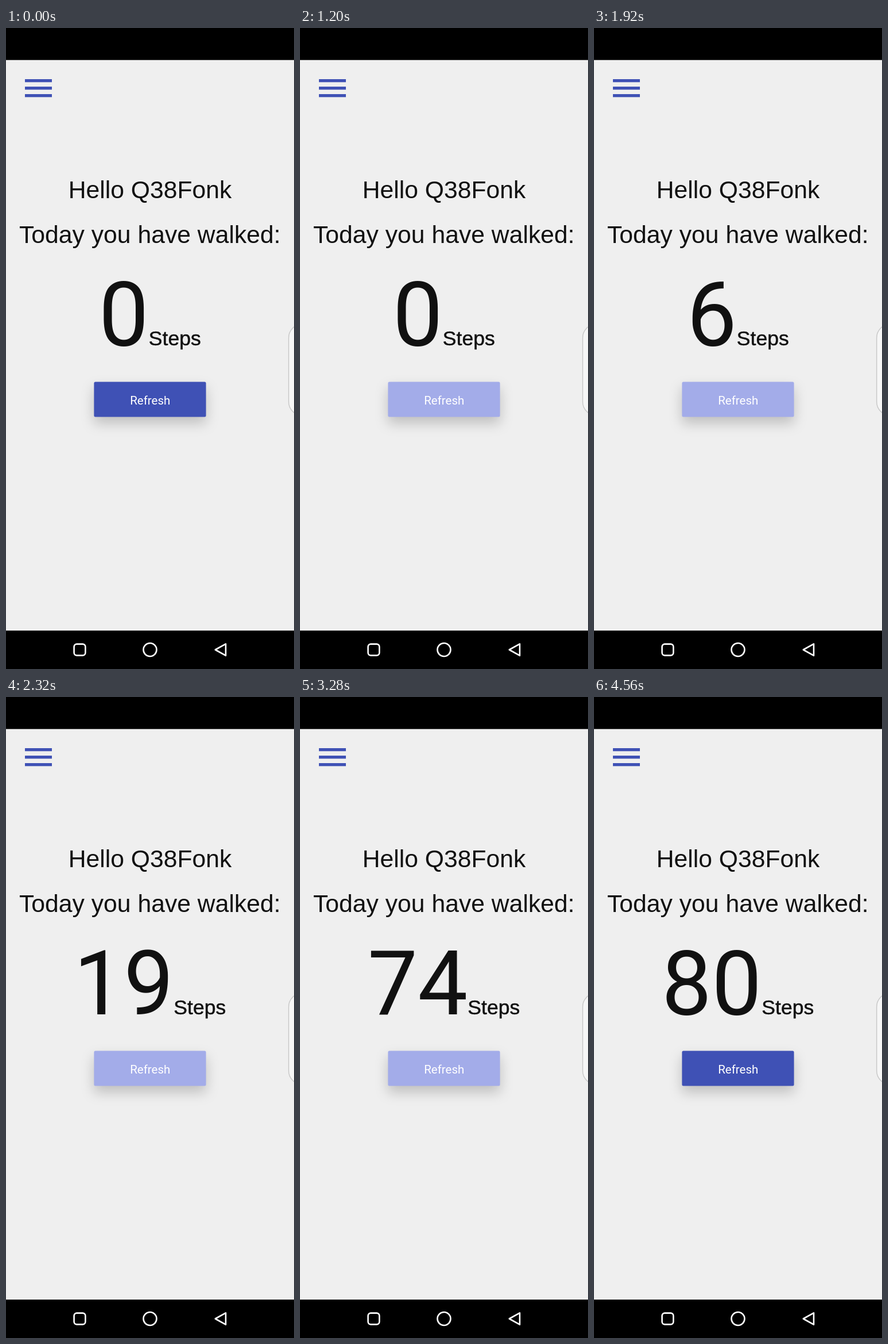
Write an HTML page that moves like this. It is 502x1115 px and loops after 4.64 s.

```html
<!DOCTYPE html>
<html lang="en">
<head>
<meta charset="utf-8">
<title>Step counter</title>
<style>
  html, body { margin: 0; width: 100%; height: 100%; overflow: hidden; background: #efefef; }
  svg { position: absolute; left: 0; top: 0; display: block; }
  #button { fill: #3f51b5; filter: drop-shadow(0 11px 11px rgba(0,0,0,.2)); }
  #button.busy { fill: #a3ace9; }
  text { text-anchor: middle; fill: #111; font-family: "Liberation Sans", Arial, sans-serif; }
  .title { font-size: 42.7px; }
  .unit { font-size: 35.6px; stroke: #111; stroke-width: .5; }
  #count { font: 155px Roboto, sans-serif; }
  .label { font: 20.5px Roboto, sans-serif; fill: #fff; }
  .nav { fill: none; stroke: #fff; stroke-width: 2.6; stroke-linejoin: round; }
</style>
</head>
<body>
<svg width="502" height="1115" viewBox="0 0 502 1115">
  <rect width="502" height="55.7"/>
  <rect y="1048.2" width="502" height="67"/>
  <path d="M33 91.7h47M33 104.7h47M33 117.7h47" stroke="#3f51b5" stroke-width="5.3"/>
  <rect x="492.7" y="515" width="60" height="159" rx="24" fill="#f6f6f6" stroke="#c9c9c9" stroke-width="1.5"/>
  <text class="title" x="251" y="296">Hello Q38Fonk</text>
  <text class="title" x="250.8" y="374">Today you have walked:</text>
  <text x="250.7" y="552"><tspan id="count">0</tspan><tspan class="unit">Steps</tspan></text>
  <rect id="button" x="153.4" y="615.4" width="195.2" height="61.2" rx="2.5"/>
  <text class="label" x="251.2" y="654.5">Refresh</text>
  <g class="nav">
    <rect x="118.6" y="1071.6" width="19.8" height="19.8" rx="4.8"/>
    <circle cx="251" cy="1081.5" r="11.5"/>
    <path d="M364.8 1081.5L383 1071.3V1091.7Z"/>
  </g>
</svg>
<script>
  const LOOP = 4640, TICK = 80;
  const BUSY_FROM = 1120, BUSY_TO = 4160;

  // time in ms, steps, steps per ms
  const knots = [
    [1440, 1, 0.003],
    [2320, 19, 0.05],
    [2800, 62, 0.05],
    [3280, 74, 0.018],
    [3880, 80, 0.003]
  ];

  function hermite([t0, a, va], [t1, b, vb], t) {
    const d = t1 - t0, p = (t - t0) / d, q = 1 - p;
    return q * q * ((1 + 2 * p) * a + p * d * va) + p * p * ((1 + 2 * q) * b - q * d * vb);
  }

  function stepsAt(t) {
    if (t < knots[0][0]) return 0;
    const next = knots.findIndex(k => t < k[0]);
    return next < 0 ? 80 : Math.round(hermite(knots[next - 1], knots[next], t));
  }

  const count = document.getElementById('count');
  const button = document.getElementById('button');
  const start = performance.now();

  function draw(now) {
    const elapsed = Math.max(0, now - start) % LOOP;
    const t = Math.floor(elapsed / TICK) * TICK;
    const steps = String(stepsAt(t));
    if (count.textContent !== steps) count.textContent = steps;
    button.classList.toggle('busy', t >= BUSY_FROM && t < BUSY_TO);
    requestAnimationFrame(draw);
  }
  draw(start);
</script>
</body>
</html>
```
